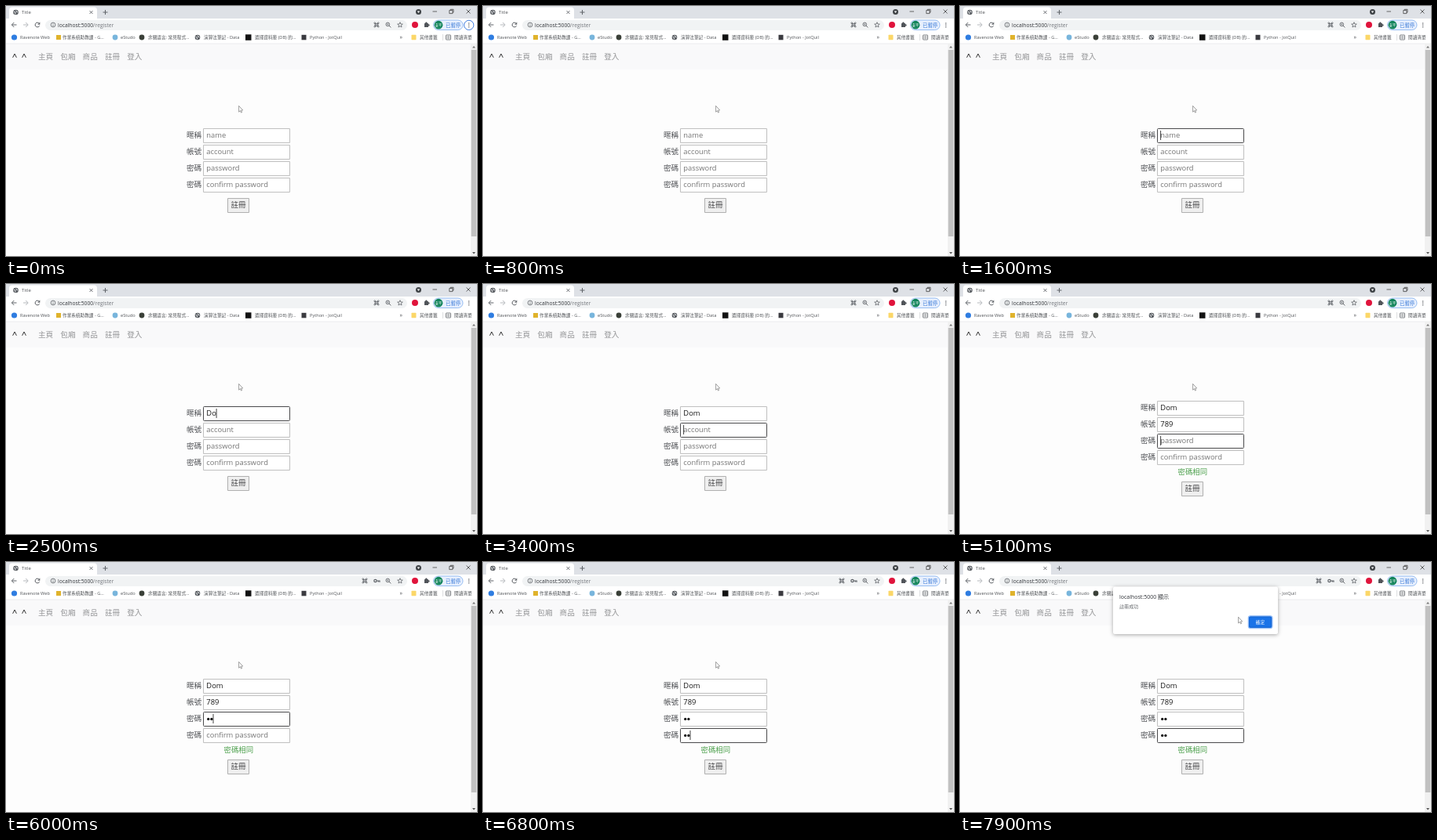
These frames come from a looping animation (600 px wide and 319 px high, 8000 ms). An HTML page with a canvas:

```html
<!DOCTYPE html>
<html lang="zh-Hant">
<head>
<meta charset="utf-8">
<title>Title</title>
<style>
html, body { margin: 0; width: 100%; height: 100%; overflow: hidden; background: #fdfdfd; }
canvas { display: block; width: 600px; height: 319px; }
</style>
</head>
<body>
<canvas id="stage"></canvas>
<script>
const canvas = document.getElementById('stage');
const ratio = window.devicePixelRatio || 1;
canvas.width = 600 * ratio;
canvas.height = 319 * ratio;
const c = canvas.getContext('2d');
const FONT = '"Open Sans", "Noto Sans CJK TC", "Noto Sans CJK", sans-serif';
const LOOP = 8000;
const ICON = '#5f6368';

// Moments of the form session, in ms
const T = { ringOff: 500, check: 5000, key: 5500, dialog: 7300, moveStart: 7450, moveEnd: 7800 };
const fields = [
  { label: '暱稱', hint: 'name', value: 'Dom', keys: [2100, 2400, 2600], focus: 1500, blur: 3200 },
  { label: '帳號', hint: 'account', value: '789', keys: [4100, 4500, 4700], focus: 3200, blur: 5000 },
  { label: '密碼', hint: 'password', value: '••', keys: [5500, 5800], focus: 5000, blur: 6200 },
  { label: '密碼', hint: 'confirm password', value: '••', keys: [6400, 6700], focus: 6200, blur: LOOP }
];

function text(s, x, y, size, color = '#505357', align = 'left') {
  c.font = `${size}px ${FONT}`;
  c.textAlign = align;
  c.fillStyle = color;
  c.fillText(s, x, y + size * 0.36);
  return c.measureText(s).width;
}

function box(x, y, w, h, fill, stroke, r = 0, width = 1) {
  c.beginPath();
  c.roundRect(x, y, w, h, r);
  if (fill) { c.fillStyle = fill; c.fill(); }
  if (stroke) { c.strokeStyle = stroke; c.lineWidth = width; c.stroke(); }
}

function disc(x, y, r, fill) {
  c.beginPath();
  c.arc(x, y, r, 0, 7);
  c.fillStyle = fill;
  c.fill();
}

function ring(x, y, r, color, width = 0.9) {
  c.beginPath();
  c.arc(x, y, r, 0, 7);
  c.strokeStyle = color;
  c.lineWidth = width;
  c.stroke();
}

// Each path is a flat list of x, y pairs
function lines(color, width, ...paths) {
  c.strokeStyle = color;
  c.lineWidth = width;
  c.beginPath();
  for (const p of paths)
    for (let i = 0; i < p.length; i += 2) c[i ? 'lineTo' : 'moveTo'](p[i], p[i + 1]);
  c.stroke();
}

function shape(color, p) {
  c.beginPath();
  for (let i = 0; i < p.length; i += 2) c.lineTo(p[i], p[i + 1]);
  c.closePath();
  c.fillStyle = color;
  c.fill();
}

function globe(x, y) {
  disc(x, y, 3.3, '#5a5e63');
  lines('#f1f3f4', 1, [x - 2.4, y - 0.8, x - 0.4, y + 0.3, x - 0.8, y + 2.3], [x + 0.3, y - 2.3, x + 0.8, y - 0.8, x + 2.4, y - 0.2]);
}

function tabStrip() {
  box(0, 0, 600, 17, '#dee1e6');
  box(4, 1.5, 112, 17, '#fff', null, [4, 4, 0, 0]);
  globe(12.5, 8);
  text('Title', 20, 8.2, 6);
  lines(ICON, 0.9, [106.5, 6, 110.5, 10], [110.5, 6, 106.5, 10]);
  lines(ICON, 1, [123.5, 8, 129.5, 8], [126.5, 5, 126.5, 11]);
  disc(525.5, 7.5, 3.5, '#3f4347');
  shape('#fff', [523.8, 6.6, 527.2, 6.6, 525.5, 9.1]);
  lines('#444', 0.8, [543.5, 7, 549, 7], [586.5, 4.5, 591.5, 9.5], [591.5, 4.5, 586.5, 9.5],
    [566.2, 5.5, 566.2, 4.3, 570, 4.3, 570, 8.2, 569, 8.2]);
  box(564.8, 5.5, 4.1, 4.1, null, '#444', 0, 0.8);
}

function commandIcon(x) {
  lines(ICON, 0.9, [x - 1.2, 21.5, x - 1.2, 26.5], [x + 1.2, 21.5, x + 1.2, 26.5],
    [x - 3, 22.8, x + 3, 22.8], [x - 3, 25.2, x + 3, 25.2]);
  for (const dx of [-2.3, 2.3])
    for (const dy of [-2.3, 2.3]) ring(x + dx, 24 + dy, 0.9, ICON, 0.7);
}

function toolbar(t) {
  box(0, 16, 600, 32, '#fff');
  lines(ICON, 1, [13.5, 24, 7.5, 24], [10.3, 21, 7.3, 24, 10.3, 27]);
  lines('#b6b9bd', 1, [22, 24, 28, 24], [25.2, 21, 28.2, 24, 25.2, 27]);
  c.beginPath();
  c.arc(40, 24, 2.9, 0.4, 5.5);
  c.strokeStyle = ICON;
  c.lineWidth = 1;
  c.stroke();
  shape(ICON, [43.3, 20.5, 43.3, 23.8, 40.2, 23.8]);

  box(50, 18, 461, 13, '#f1f3f4', null, 6.5);
  ring(60, 24, 2.9, ICON, 0.8);
  lines(ICON, 0.8, [60, 23.6, 60, 25.8], [60, 22.2, 60, 22.9]);
  const w = text('localhost:5000', 66, 24.2, 6.7, '#303338');
  text('/register', 66 + w, 24.2, 6.7, '#73777c');

  const hasKey = t >= T.key;
  commandIcon(hasKey ? 457 : 472);
  if (hasKey) {
    ring(470.5, 24, 1.7, ICON, 1.2);
    lines(ICON, 1.2, [472.2, 24, 476, 24, 476, 25.8], [474.3, 24, 474.3, 25.4]);
  }
  ring(486.3, 23.4, 2.3, ICON);
  lines(ICON, 1, [488, 25.1, 490.3, 27.4]);
  lines(ICON, 0.6, [485.1, 23.4, 487.5, 23.4], [486.3, 22.2, 486.3, 24.6]);
  const star = [];
  for (let i = 0; i <= 10; i++) {
    const r = i % 2 ? 1.5 : 3.5, a = i * Math.PI / 5;
    star.push(502 + r * Math.sin(a), 24.2 - r * Math.cos(a));
  }
  lines(ICON, 0.8, star);

  disc(521, 24, 4, '#e0143c');
  box(533, 22, 5, 5, '#505459', null, 0.6);
  disc(535.4, 21.6, 1.2, '#505459');
  disc(538.4, 24.4, 1.2, '#505459');
  box(544.5, 18, 37.5, 12.5, '#e8f0fe', '#8db7f0', 6.2, 0.9);
  disc(551, 24.2, 5.4, '#11845b');
  text('安平', 551, 24.3, 4.2, '#fff', 'center');
  text('已暫停', 560, 24.3, 6.4, '#3577d6');
  if (t < T.ringOff) ring(589.7, 24.4, 6.1, '#3f7de0', 1);
  for (const dy of [-2.4, 0, 2.4]) disc(589.7, 24.3 + dy, 0.75, ICON);
}

function bookmarks() {
  const mark = (s, x) => text(s, x, 40.2, 5.65);
  disc(10.5, 40, 3.6, '#2f7de1');
  mark('Ravenote Web', 18);
  box(64, 37, 6, 6, '#e0b32c');
  mark('作業系統助教課 - G...', 72);
  disc(139, 40, 3.4, '#78b5dc');
  mark('eStudo', 146);
  disc(173, 40, 3.4, '#3a4038');
  mark('非關語言: 常見程式...', 181);
  globe(244, 40);
  mark('演算法筆記 - Data', 252);
  box(305, 36.3, 7.5, 7.5, '#111');
  mark('選擇資料庫 (DB) 的...', 317);
  box(376.5, 36.8, 6, 6.5, '#3b3b40');
  mark('Python - JotQuil', 387);
  text('»', 501.5, 39.5, 7);
  box(516.5, 36.8, 6, 6.4, '#fbd768', null, 0.6);
  mark('其他書籤', 527);
  lines('#d5d7da', 0.8, [556.5, 36, 556.5, 44]);
  box(560.5, 37, 6, 6, null, ICON, 0.5, 0.8);
  lines(ICON, 0.8, [561.7, 39, 565.3, 39], [561.7, 41, 565.3, 41]);
  mark('閱讀清單', 571);
}

function page() {
  box(0, 48, 600, 271, '#fdfdfd');
  box(0, 48, 592, 33, '#f9f9fa');
  lines('#e4e6e8', 0.7, [0, 48, 600, 48]);
  lines('#333', 1, [8.6, 65.8, 11, 61, 13.4, 65.8], [20.6, 65.8, 23, 61, 25.4, 65.8]);
  ['主頁', '包廂', '商品', '註冊', '登入'].forEach((s, i) => text(s, 41 + i * 28.3, 64.5, 9.6, '#949597'));
  box(592, 48, 8, 271, '#f1f1f1');
  box(592.7, 56, 6.6, 238, '#c1c1c1');
  shape('#777', [594, 53.4, 598, 53.4, 596, 51]);
  shape('#505050', [594, 314, 598, 314, 596, 316.4]);
}

function field(f, i, t, dy) {
  const y = 165 + Math.round(i * 21.1) + dy;
  const focused = t >= f.focus && t < f.blur;
  const typed = f.keys.filter(k => t >= k);
  const secret = f.value[0] === '•';
  text(f.label, 230, y, 9.6, '#505256');
  box(251.5, y - 8.5, 110, 18, '#fff', focused ? '#4a4a4c' : '#c0c0c0', focused ? 1 : 0);
  let w = 0;
  if (!typed.length) text(f.hint, 255.3, y, 9.4, '#757575');
  else if (secret) {
    typed.forEach((_, n) => disc(257.7 + n * 4.2, y + 0.4, 1.65, '#111'));
    w = typed.length * 4.2;
  } else w = text(f.value.slice(0, typed.length), 255.3, y, 9.4, '#151515');
  const last = Math.max(f.focus, ...typed);
  if (focused && t < T.dialog && (t - last) % 1000 < 500)
    lines('#111', 0.8, [255.6 + w, y - 6, 255.6 + w, y + 6]);
}

function form(t) {
  const checked = t >= T.check;
  const dy = checked ? -7 : 0;
  fields.forEach((f, i) => field(f, i, t, dy));
  if (checked) text('密碼相同', 296.3, 239.3, 9.4, '#4da04d', 'center');
  const y = checked ? 261 : 254;
  box(282.5, y - 8.5, 27, 18, '#efefef', '#b0b0b0');
  text('註冊', 296, y, 9.6, '#48484a', 'center');
}

function dialog() {
  c.save();
  c.shadowColor = 'rgba(0,0,0,.35)';
  c.shadowBlur = 5 * ratio;
  c.shadowOffsetY = ratio;
  box(195, 31.5, 210, 60.5, '#fff', null, 2.5);
  c.restore();
  text('localhost:5000 顯示', 203, 44.2, 7, '#303338');
  text('註冊成功', 203, 57.2, 6.1, '#65686c');
  box(367.3, 68.8, 30.6, 15.8, '#1a73e8', '#9cc0f5', 2.5, 1.2);
  box(368.7, 70.2, 27.8, 13, null, '#1a65cc', 1.5, 0.8);
  text('確定', 382.6, 76.8, 5.8, '#fff', 'center');
}

function pointer(t) {
  const p = Math.min(1, Math.max(0, (t - T.moveStart) / (T.moveEnd - T.moveStart)));
  const e = p * p * (3 - 2 * p);
  c.save();
  c.translate(296.6 + 58 * e, 127.4 - 57.2 * e);
  c.beginPath();
  [[0, 0], [0, 7.8], [1.7, 6.2], [2.9, 8.7], [4, 8.2], [2.9, 5.8], [5.1, 5.6]].forEach(q => c.lineTo(...q));
  c.closePath();
  c.fillStyle = '#fff';
  c.fill();
  c.strokeStyle = '#777';
  c.lineWidth = 0.7;
  c.stroke();
  c.restore();
}

function draw(t) {
  c.setTransform(ratio, 0, 0, ratio, 0, 0);
  tabStrip();
  toolbar(t);
  bookmarks();
  page();
  form(t);
  if (t >= T.dialog) dialog();
  pointer(t);
}

const start = performance.now();
function tick() {
  draw((performance.now() - start) % LOOP);
  requestAnimationFrame(tick);
}
tick();
</script>
</body>
</html>
```
